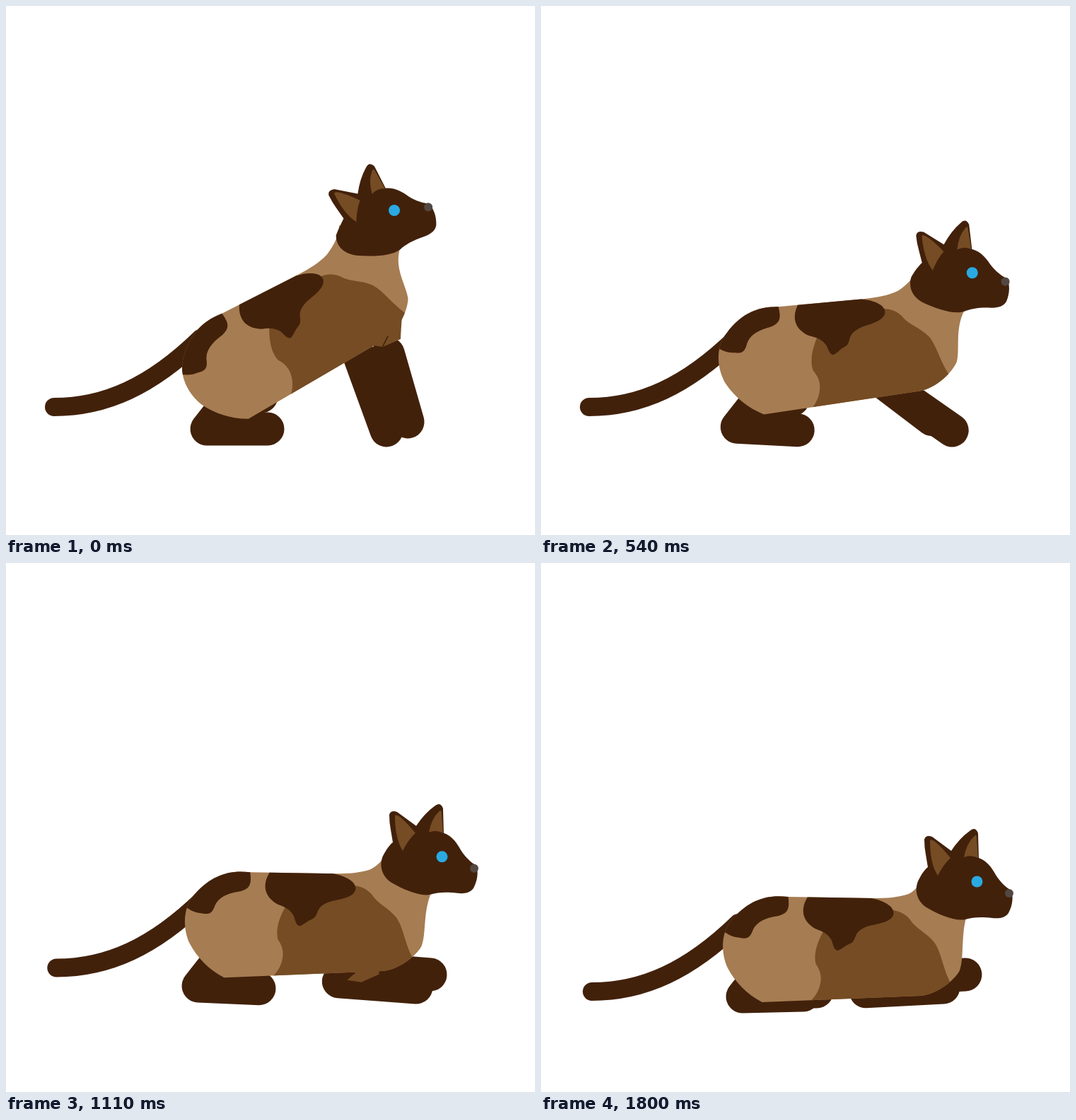
Write an HTML page with a canvas that moves like this. It is 748x748 px and loops after 2700 ms.

```html
<!DOCTYPE html>
<html>
<head>
<meta charset="utf-8">
<style>
html, body { margin: 0; height: 100%; overflow: hidden; background: #fff; }
canvas { display: block; }
</style>
</head>
<body>
<canvas id="stage" width="748" height="748"></canvas>
<script>
const ctx = document.getElementById('stage').getContext('2d');
const DARK = '#42210b', MID = '#754c24', LIGHT = '#a67c52';
const LEG = 47;

// Shapes are drawn lying down, in stage coordinates.
const backPatch = new Path2D(`M377 465 L377 473 C368 488 368 505 388 517 C398 521 405 523 411 533
  C414 540 414 547 420 548 C426 546 430 541 438 538 C447 533 442 524 455 517 C465 511 476 512 488 507
  C500 502 502 494 495 486 C486 478 476 476 468 474 L468 465 Z`);
const rumpPatch = new Path2D(`M350 460 L350 472 C352 489 350 495 336 499 C316 502 305 508 300 519
  C296 530 292 532 282 530 C273 529 268 527 262 523 L235 512 L260 460 Z`);
const sidePatch = new Path2D(`M399 522 C389 540 386 556 389 567 C398 580 397 590 394 600
  C390 611 385 617 376 624 L560 640 L590 608 L578 591 C568 570 566 550 557 537
  C545 522 530 517 522 504 C515 495 505 491 490 490 Z`);
const leftInnerEar = new Path2D('M550 392 Q555 388 579 417 Q570 425 561 442 Q550 425 550 392 Z');
const rightInnerEar = new Path2D('M612 387 Q616 382 616 390 L618 417 Q608 412 598 416 Q602 396 612 387 Z');

// The neck runs up to the chin and nape, wherever the head is.
const bodyShape = (chin, nape) => new Path2D(`M350 472 C318 468 295 478 274 500
  C253 520 255 552 264 572 C275 593 292 610 313 621 L537 612 C560 610 584 591 592 577
  C599 560 594 530 ${chin.x} ${chin.y} L${nape.x} ${nape.y}
  C${nape.x - 5} ${nape.y + 12} 533 462 520 468 C505 473 490 474 470 474 Z`);

const headShape = s => new Path2D(`M547 430 L544 412 Q542 402 542 391 Q544 384 553 387 L580 407
  Q592 389 606 379 Q614 372 618 382 L619 417 C632 422 638 432 643 441
  C650 452 658 459 665 463 C668 472 667 484 661 495 C656 502 648 503 638 502
  C622 500 610 501 600 504 C585 507 562 497 ${545 - 4 * s} ${487 - 2 * s}
  C${529 - 7 * s} ${476 - 3 * s} ${529 - 7 * s} ${460 - 3 * s} ${533 - 6 * s} ${450 - 3 * s}
  C${538 - 4 * s} 440 542 434 547 430 Z`);

const ramp = (t, from, to) => Math.max(0, Math.min(1, (t - from) / (to - from)));

// Moves the resting anchor (ax, ay) to (x, y) and turns around it.
const placed = (x, y, deg, ax, ay) => new DOMMatrix().translate(x, y).rotate(deg).translate(-ax, -ay);

function fill(color, path) {
  ctx.fillStyle = color;
  ctx.fill(path);
}

function line(width, ...p) {
  ctx.strokeStyle = DARK;
  ctx.lineWidth = width;
  ctx.beginPath();
  for (let i = 0; i < p.length; i += 2) ctx.lineTo(p[i], p[i + 1]);
  ctx.stroke();
}

function disc(color, x, y, r) {
  ctx.fillStyle = color;
  ctx.beginPath();
  ctx.arc(x, y, r, 0, 7);
  ctx.fill();
}

// The point a given length back from a paw.
function back(x, y, length, deg) {
  const a = deg * Math.PI / 180;
  return [x - length * Math.cos(a), y - length * Math.sin(a)];
}

function draw(t) {
  const left = 1 - ramp(t, 0, 1230);   // how much of the lean remains
  const step = ramp(t, 0, 960);        // paws sliding forward
  const sink = ramp(t, 1050, 1410);    // lowering to the ground
  const drop = Math.min(1, 2 * sink);
  const settle = ramp(t, 1410, 1800);
  const rest = ramp(t, 1410, 1620);    // the tail settles before the legs
  const arc = Math.sin(Math.PI * step);
  const quick = left ** 4;

  ctx.fillStyle = '#fff';
  ctx.fillRect(0, 0, 748, 748);
  ctx.lineCap = ctx.lineJoin = 'round';

  const tailX = 68 + 10 * drop - 6 * rest, tailY = 567 + 33 * sink + 6 * rest;
  ctx.strokeStyle = DARK;
  ctx.lineWidth = 26;
  ctx.stroke(new Path2D(`M${tailX} ${tailY} c72 0 137 -29 207 -97`));

  // Front legs
  const angle = 70 * left ** 1.2 - 3 * settle;
  const nearX = 586 - 48 * quick - 11 * ramp(t, 750, 1410) - 6 * settle, nearY = 600;
  const farX = 568 + 32 * step - 34 * arc, farY = 588 - 6 * step;
  line(LEG, nearX, nearY, ...back(nearX, nearY, 110, angle));
  line(LEG, farX, farY, ...back(farX, farY, 100, angle + 4 * left));

  // Hind legs
  const heelX = 284 - 12 * step + 13 * settle, heelY = 598 - 5 * step + 15 * drop + 5 * settle;
  const toeY = 598 + 3 * step + 4 * sink + 6 * settle;
  const footX = 361 - 9 * step + 38 * settle, footY = 552 + 8 * step + 44 * sink + 2 * settle;
  line(LEG, heelX + 22, heelY - 28, heelX, heelY, heelX + 86, toeY);
  line(LEG, footX - 20, footY, footX, footY);

  // The body turns about the hip; the head follows its own path.
  const bodyAt = placed(334 + 5 * sink, 511 + 41.6 * sink - 4.5 * arc, -28 * left ** 2.6, 339.4, 552.6);
  const headAt = placed(616.5 - 67.5 * quick, 409 - 120 * left ** 2.3 + 41.5 * sink,
    -25.5 * left ** 2.8, 616.5, 450.5);
  const stretch = left ** 1.3;
  const headToBody = bodyAt.inverse().multiply(headAt);
  const inBody = (x, y) => headToBody.transformPoint(new DOMPoint(x, y));

  ctx.save();
  ctx.setTransform(bodyAt);
  const shape = bodyShape(inBody(601, 502), inBody(542 - 5 * stretch, 438 - 2 * stretch));
  fill(LIGHT, shape);
  ctx.clip(shape);
  fill(MID, sidePatch);
  fill(DARK, backPatch);
  fill(DARK, rumpPatch);
  ctx.restore();

  // Shoulder over the near leg, with a crease while sitting
  const [sx, sy] = back(nearX, nearY, 78 + 40 * quick, 1.25 * angle);
  fill(MID, new Path2D(`M${sx} ${sy} l-20 -3 l47 -41 l-2 33 Z`));
  const crease = 1 - ramp(t, 0, 330);
  if (crease) line(1.5, sx, sy - 1, sx + 7 * crease, sy - 1 - 14 * crease);

  ctx.save();
  ctx.setTransform(headAt);
  fill(DARK, headShape(stretch));
  fill(MID, leftInnerEar);
  fill(MID, rightInnerEar);
  disc('#29abe2', 616.5, 450.5, 8);
  disc('#534741', 662, 467, 6);
  ctx.restore();
}

const start = performance.now();
function tick() {
  const t = (performance.now() - start) % 2700;
  draw(Math.floor(t / 30) * 30);
  requestAnimationFrame(tick);
}
tick();
</script>
</body>
</html>
```
